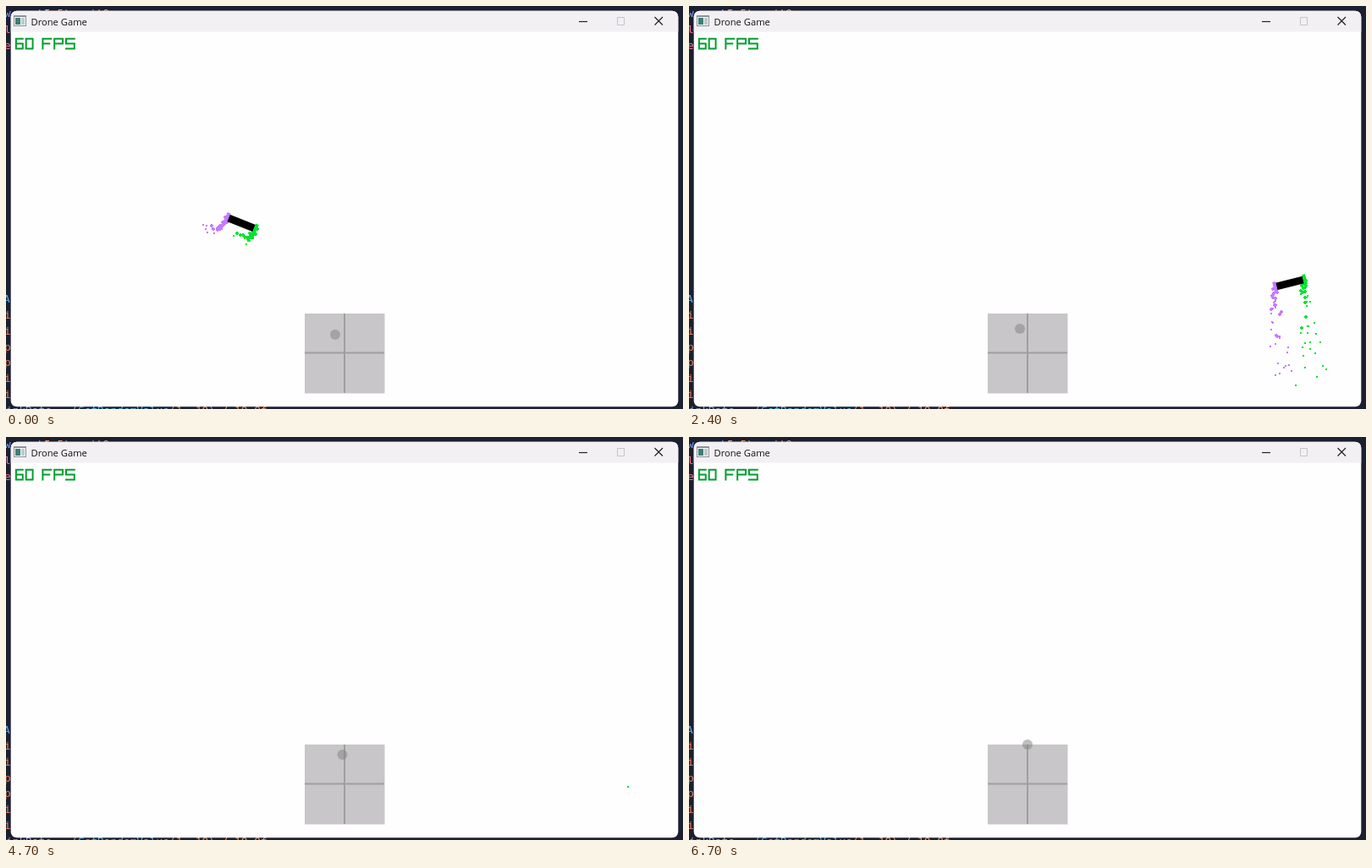
An HTML page with a canvas for the animation above (7000 ms loop, 800 px wide and 477 px high).

```html
<!DOCTYPE html>
<html lang="en">
<head>
<meta charset="utf-8">
<title>Drone Game</title>
<style>
html, body { margin: 0; width: 100%; height: 100%; overflow: hidden; background: #1a2030; }
canvas { display: block; }
</style>
</head>
<body>
<canvas id="stage" width="800" height="477" aria-label="Drone Game, 60 FPS"></canvas>
<script>
const ctx = document.getElementById('stage').getContext('2d');
const LOOP = 7000, STEP = 100, MAX_LIFE = 220, EMIT_EVERY = 2.5;
const GRAVITY = 8e-4, FLOOR = 445;
const PURPLE = '#c77aff', GREEN = '#00e430';

// Steered flight: [time, x, y, tilt in degrees]
const course = [
  [-100, 262, 262, 15], [0, 278, 257, 22], [400, 310, 70, 0], [850, 275, 420, -5],
  [1400, 319, 164.5, 28], [1700, 375, 75, 20], [2150, 695, 430, -15], [2400, 710, 328, -14],
  [2700, 750, 215, -20], [3400, 265, 404, 4], [3950, 62, 330, -40]
];

// Respawns that tumble under gravity until they reach the floor
const tumbles = [
  { start: 4000, x: 418, y: 248, vx: 0.6, vy: 0, tilt: 183, spin: 0.2 },
  { start: 5000, x: 651, y: 262, vx: -0.9, vy: 0, tilt: 100, spin: 0.3 },
  { start: 5540, x: 440, y: 252, vx: 0.18, vy: -0.52, tilt: 0, spin: 0.03 }
];

// Joystick: [time, x, y]
const stick = [
  [0, 389, 389], [800, 380, 380], [1400, 419.5, 390], [2400, 391, 382], [3400, 400, 376],
  [4100, 443, 411], [4600, 395, 372], [5100, 428.5, 411], [6700, 400, 364]
];

// Smooth cubic through timed keys
function sample(keys, t) {
  const last = keys.length - 1;
  t = Math.max(keys[0][0], Math.min(keys[last][0], t));
  let i = 0;
  while (i < last - 1 && keys[i + 1][0] <= t) i++;
  const a = keys[i], b = keys[i + 1], span = b[0] - a[0], u = (t - a[0]) / span;
  const slope = (k, c) => {
    const p = keys[Math.max(0, k - 1)], n = keys[Math.min(last, k + 1)];
    return (n[c] - p[c]) / (n[0] - p[0]) * span;
  };
  return a.map((v, c) => v + u * u * (3 - 2 * u) * (b[c] - v) +
    u * (1 - u) * ((1 - u) * slope(i, c) - u * slope(i + 1, c)));
}

function pose(x, y, degrees) {
  const angle = degrees * Math.PI / 180;
  return { x, y, angle, cos: Math.cos(angle), sin: Math.sin(angle) };
}

function droneAt(t) {
  if (t < course[0][0]) return null;
  if (t < course.at(-1)[0]) return pose(...sample(course, t).slice(1));
  const fall = tumbles.findLast(f => t >= f.start);
  if (!fall) return null;
  const s = t - fall.start;
  const y = fall.y + fall.vy * s + GRAVITY * s * s;
  return y > FLOOR ? null : pose(fall.x + fall.vx * s, y, fall.tilt + fall.spin * s);
}

function random(seed) {
  const v = Math.sin(seed * 12.9898 + 4.1) * 43758.5453;
  return v - Math.floor(v);
}

function rect(color, x, y, w, h) {
  ctx.fillStyle = color;
  ctx.fillRect(x, y, w, h);
}

function line(color, width, path) {
  ctx.strokeStyle = color;
  ctx.lineWidth = width;
  ctx.stroke(new Path2D(path));
}

function text(str, x, y, color, font = '12.8px "DejaVu Sans Mono", monospace') {
  ctx.fillStyle = color;
  ctx.font = font;
  ctx.fillText(str, x, y);
}

function drawEditor() {
  rect('#1a2030', 0, 0, 800, 477);
  text('w.rect(', -2, 13, '#7aa2f7');
  text('5,5);  it0', 45, 13, '#e8966a');
  [...'le'].forEach((s, i) => text(s, -2, 32 + i * 19, '#f7768e'));
  text('A', -3, 351, '#5ab0e8');
  [...'iippii'].forEach((s, i) => text(s, -2, 370 + i * 18.8, '#f0805a'));
  text('inkRate = (', 0, 483, '#9aa5ce');
  text('GetRandomValue', 85, 483, '#5ab0e8');
  text('(1, 10) / 10.0f;', 193, 483, '#e8966a');
}

function drawWindow() {
  ctx.save();
  ctx.beginPath();
  ctx.roundRect(5.7, 5.7, 788.6, 468.5, 7);
  ctx.clip();
  rect('#fefefe', 5, 5, 790, 470);
  rect('#f3f0f4', 5, 5, 790, 25.5);
  ctx.restore();

  rect('#8b9296', 9, 11, 15, 13);
  rect('#f4f6f6', 10, 13, 13, 10);
  rect('#3f7f78', 11, 14, 6, 8);
  rect('#b9cdd0', 18, 14, 4, 8);
  text('Drone Game', 29.5, 22.5, '#111', '11.2px "Open Sans", sans-serif');
  line('#222', 1.2, 'M677 18.5H687');
  line('#c4c4c4', 1, 'M722.5 13.5H730.5V22.5H722.5Z');
  line('#222', 1.2, 'M766.5 13L776 22.5M776 13L766.5 22.5');

  // "60 FPS" on a seven-row pixel grid
  ctx.save();
  ctx.translate(10.9, 37.7);
  ctx.scale(1.97, 1.97);
  line('#009e2f', 1, 'M5 .5H.5V6.5H4.5V3.5H.5M6.5 .5H10.5V6.5H6.5Z' +
    'M22 .5H16.5V7M16.5 3.5H21M23.5 7V.5H28.5V3.5H23.5M36 .5H30.5V3.5H35.5V6.5H30');
  ctx.restore();
}

function drawStick(t) {
  rect('#c8c6c8', 353, 364, 94.5, 94.5);
  line('#a09fa0', 2, 'M400 364V458M353 410.5H447');
  const [, x, y] = sample(stick, t);
  ctx.fillStyle = 'rgba(130,130,130,.52)';
  ctx.beginPath();
  ctx.arc(x, y, 6, 0, 7);
  ctx.fill();
}

function drawParticles(t) {
  for (let k = Math.ceil((t - MAX_LIFE) / EMIT_EVERY); k * EMIT_EVERY <= t; k++) {
    const born = k * EMIT_EVERY, age = t - born, drone = droneAt(born);
    if (!drone || sample(stick, born)[2] > 405) continue;
    for (const side of [-1, 1]) {
      const seed = k * 7 + side;
      const life = 45 + (MAX_LIFE - 45) * random(seed) ** 2.5;
      if (age > life) continue;
      const push = 0.04 + 0.12 * random(seed + .3), drift = 0.2 * (random(seed + .6) - .5);
      const along = side * 18 + drift * age, down = push * age;
      const jitter = 6 * (random(seed + .8) - .5);
      const x = Math.round(drone.x + along * drone.cos - down * drone.sin + jitter);
      const y = Math.round(drone.y + along * drone.sin + down * drone.cos);
      if (x < 7 || x > 792 || y < 32 || y > 471) continue;
      const color = side < 0 ? PURPLE : GREEN;
      rect(color, x - 1, y - 1, 2, 2);
      if (age < life / 2) {
        rect(color, x - 2, y - 1, 4, 2);
        rect(color, x - 1, y - 2, 2, 4);
      }
    }
  }
}

function drawDrone(t) {
  const drone = droneAt(t);
  if (!drone) return;
  ctx.save();
  ctx.translate(drone.x, drone.y);
  ctx.rotate(drone.angle);
  rect('#000', -16.5, -4.5, 33, 9);
  rect(PURPLE, -20, -6, 4, 12);
  rect(GREEN, 16, -6, 4, 12);
  ctx.restore();
}

function frame(now) {
  const t = Math.floor(now % LOOP / STEP) * STEP;
  drawEditor();
  drawWindow();
  drawParticles(t);
  drawDrone(t);
  drawStick(t);
  requestAnimationFrame(frame);
}
requestAnimationFrame(frame);
</script>
</body>
</html>
```
